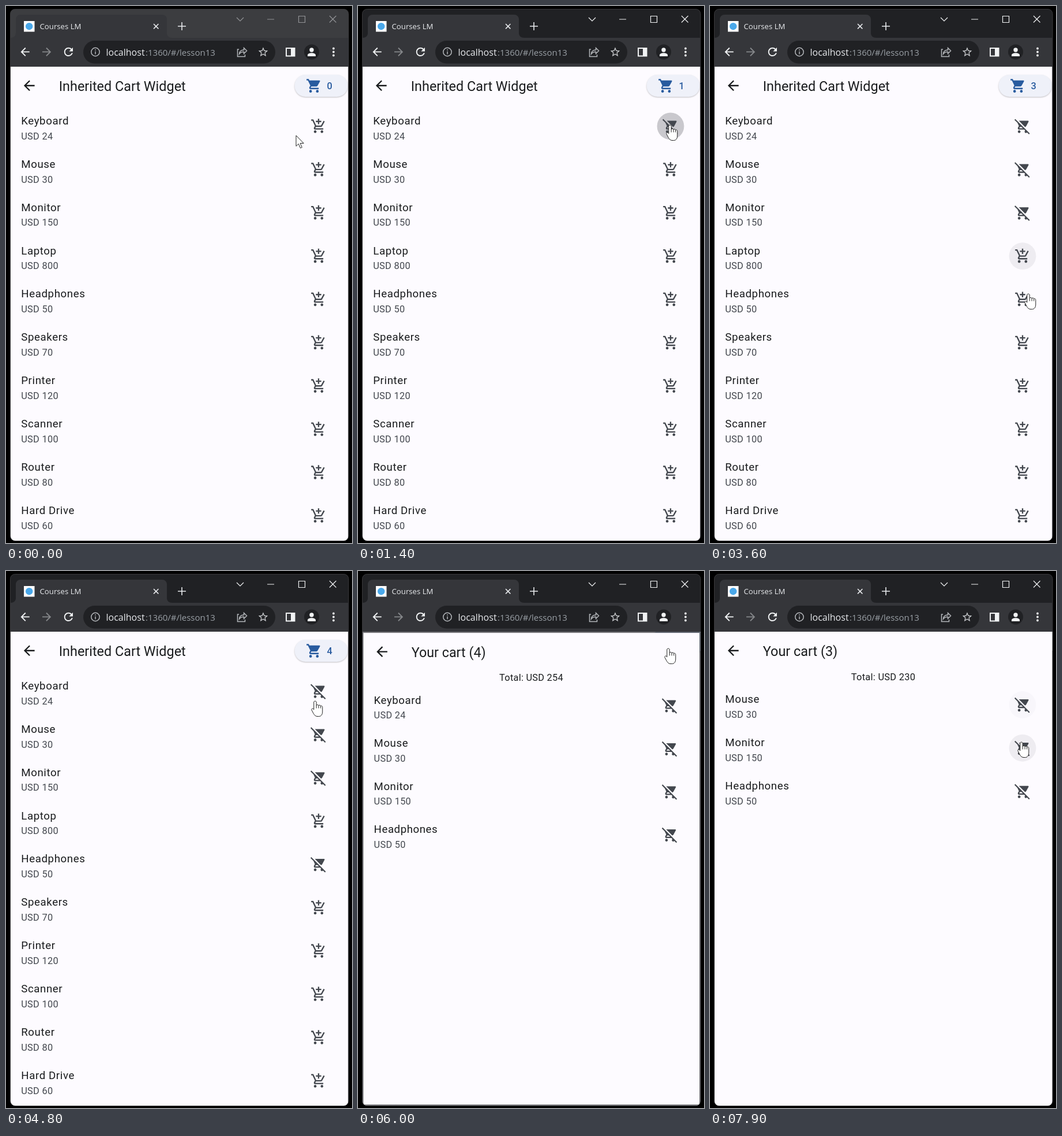
Write an HTML page that moves like this. It is 600 px wide and 929 px high and loops after 8000 ms.

```html
<!DOCTYPE html>
<html lang="en">
<head>
<meta charset="utf-8">
<title>Shopping cart demo</title>
<style>
  html, body { margin: 0; width: 100%; height: 100%; overflow: hidden; background: #000; }
  svg { display: block; width: 600px; height: 929px; }
  text { white-space: pre; }
  .ui { font-family: "Open Sans", "Noto Sans", sans-serif; }
  .app { font-family: Roboto, sans-serif; fill: #1a1c1e; }
  .head { font-size: 23.4px; }
  .name { font-size: 18.72px; letter-spacing: .585px; }
  .price { font-size: 16.38px; letter-spacing: .29px; fill: #43474e; }
  .total { font-size: 16.38px; letter-spacing: .29px; text-anchor: middle; }
  .count { font-size: 16.38px; font-weight: 500; fill: #285b9f; }
  .icon { fill: #43474e; }
  .line { fill: none; stroke: #e8eaed; stroke-width: 1.6; }
  .pill { fill: #eff1f9; filter: drop-shadow(0 1px 1.3px rgba(0, 0, 0, .24)); }
  .cursor path { fill: #fff; stroke: #222; stroke-width: 1; stroke-linejoin: round; }
</style>
</head>
<body>
<svg viewBox="0 0 600 929">
  <defs>
    <path id="back" d="M20 11H7.83l5.59-5.59L12 4l-8 8 8 8 1.41-1.41L7.83 13H20z"/>
    <path id="add" d="M11 9h2V6h3V4h-3V1h-2v3H8v2h3zm-4 9c-1.1 0-1.99.9-1.99 2S5.9 22 7 22s2-.9 2-2-.9-2-2-2zm10 0c-1.1 0-1.99.9-1.99 2s.89 2 1.99 2 2-.9 2-2-.9-2-2-2zm-9.83-3.25l.03-.12.9-1.63h7.45c.75 0 1.41-.41 1.75-1.03l3.86-7.01L19.42 4h-.01l-1.1 2-2.76 5H8.53l-.13-.27L6.16 6l-.95-2-.94-2H1v2h2l3.6 7.59-1.35 2.45c-.16.28-.25.61-.25.96 0 1.1.9 2 2 2h12v-2H7.42c-.13 0-.25-.11-.25-.25z"/>
    <path id="remove" d="M22.73 22.73L1.27 1.27 0 2.54l4.39 4.39 2.21 4.66-1.35 2.45c-.16.28-.25.61-.25.96 0 1.1.9 2 2 2h7.46l1.38 1.38c-.5.36-.83.95-.83 1.62 0 1.1.89 2 1.99 2 .67 0 1.26-.33 1.62-.84L21.46 24zM7.42 15c-.14 0-.25-.11-.25-.25l.03-.12.9-1.63h2.36l2 2zm8.13-2c.75 0 1.41-.41 1.75-1.03l3.58-6.49c.08-.14.12-.31.12-.48 0-.55-.45-1-1-1H6.54zM7 18c-1.1 0-1.99.9-1.99 2S5.9 22 7 22s2-.9 2-2-.9-2-2-2z"/>
    <path id="cart" d="M7 18c-1.1 0-1.99.9-1.99 2S5.9 22 7 22s2-.9 2-2-.9-2-2-2zM1 2v2h2l3.6 7.59-1.35 2.45c-.16.28-.25.61-.25.96 0 1.1.9 2 2 2h12v-2H7.42c-.14 0-.25-.11-.25-.25l.03-.12.9-1.63h7.45c.75 0 1.41-.41 1.75-1.03l3.58-6.49c.08-.14.12-.31.12-.48 0-.55-.45-1-1-1H5.21l-.94-2zm16 16c-1.1 0-1.99.9-1.99 2s.89 2 1.99 2 2-.9 2-2-.9-2-2-2z"/>
    <path id="reload" d="M17.65 6.35C16.2 4.9 14.21 4 12 4c-4.42 0-7.99 3.58-7.99 8s3.57 8 7.99 8c3.73 0 6.84-2.55 7.73-6h-2.08c-.82 2.33-3.04 4-5.65 4-3.31 0-6-2.69-6-6s2.69-6 6-6c1.66 0 3.14.69 4.22 1.78L13 11h7V4z"/>
    <path id="star" d="M22 9.24l-7.19-.62L12 2 9.19 8.63 2 9.24l5.46 4.73L5.82 21 12 17.27 18.18 21l-1.63-7.03zM12 15.4l-3.76 2.27 1-4.28-3.32-2.88 4.38-.38L12 6.1l1.71 4.04 4.38.38-3.32 2.88 1 4.28z"/>
    <clipPath id="view"><path d="M8 105H593.5V917a8 8 0 0 1-8 8H16a8 8 0 0 1-8-8z"/></clipPath>
  </defs>

  <!-- browser window -->
  <rect id="frame" x="7.5" y="5.5" width="586.5" height="919.5" rx="8" stroke="#3a3a3c"/>
  <path fill="#35363a" d="M8 55c5 0 9-3 9-8V23a8 8 0 0 1 8-8H271a8 8 0 0 1 8 8v24c0 5 4 8 9 8H593.5v50H8z"/>
  <rect x="31" y="26" width="18.5" height="18.5" fill="#fff"/>
  <circle cx="40.2" cy="35.2" r="6.2" fill="#4aa8ea"/>
  <g class="ui">
    <text x="58.5" y="40" font-size="13.2" fill="#e8eaed">Courses LM</text>
    <rect x="134" y="60" width="333" height="39.5" rx="19.7" fill="#202124"/>
    <text x="173.5" y="85.5" font-size="16" fill="#e8eaed">localhost</text>
    <text x="242" y="85.5" font-size="15" fill="#9aa0a6">:1360/#/lesson13</text>
  </g>
  <path class="line" d="M256 31l8.4 8.4M264.4 31l-8.4 8.4M298 35h14M305 28v14"/>
  <g id="controls" class="line" style="stroke-width:1.2">
    <path d="M400 20l6 6 6-6M453 23h12M507.5 17.5h11v11h-11zM561 17l11.5 11.5M572.5 17L561 28.5"/>
  </g>
  <g fill="#f1f3f4">
    <use href="#back" transform="translate(21.7 68) scale(.95)"/>
    <use href="#back" transform="translate(82 68) scale(-.95 .95)" fill="#85878a"/>
    <use href="#reload" transform="translate(97 68) scale(.95)"/>
    <use href="#star" transform="translate(436 69.7) scale(.83)" fill="#c8cacd"/>
    <path d="M485 72h16.5v15.5H485zm2 2v11.5h7V74z" fill-rule="evenodd"/>
    <circle cx="530" cy="79.5" r="13" fill="#202124"/>
    <circle cx="530" cy="76" r="3.7"/>
    <path d="M523 87v-2c0-5 14-5 14 0v2z"/>
    <path d="M568 73.5v12.1" stroke="#f1f3f4" stroke-width="3.8" stroke-linecap="round" stroke-dasharray="0 6"/>
  </g>
  <g class="line" style="stroke:#b4b7bb;stroke-width:1.5">
    <circle cx="155" cy="79.5" r="7.2"/>
    <path d="M155 78.5v5M155 75v1.8M404 75h-2.5v12.5h13V84M404.5 83c.5-5 4-7 8-7v-3.5l5 5-5 5v-3.3c-4 0-6 1-8 3.8z"/>
  </g>

  <!-- app pages -->
  <g clip-path="url(#view)" class="app">
    <g id="shop"></g>
    <rect id="scrim" x="8" y="105" width="586" height="820"/>
    <g id="basket"></g>
  </g>

  <g id="cursor" class="cursor">
    <path id="arrow" d="M0 0V18.5L4.3 14.5 7.5 21.8 10.3 20.5 7.2 13.5H13.2z"/>
    <g id="hand">
      <path d="M-2.2 2C-2.2-.6 2.2-.6 2.2 2V7.6C2.6 6 5.8 6 6.1 7.8 6.8 6.4 9.4 6.8 9.7 8.8 10.6 7.6 12.8 8.2 12.8 10.5V18C12.8 23.5 10.5 26.5 6.5 26.5H4C.5 26.500-1 24.5-2.800 21.500L-6 15.5C-6.800 13.500-4.300 12-3 13.7L-2.200 14.8z"/>
      <path style="fill:none" d="M2.2 7.600V12.500M6.100 7.800V12.500M9.700 8.800V12.500"/>
    </g>
  </g>
</svg>

<script>
const LOOP = 8000, TICK = 100;
const S = 1.17; // page zoom: layout units to pixels
const LEFT = 7.5, TOP = 105, PITCH = 64 * S, ICON_X = 542, RADIUS = 20 * S;
const SHOP_Y = TOP + (56 + 32) * S, CART_Y = SHOP_Y + 20 * S;
const PILL = { x: 500.5, y: 119, w: 92, h: 38 };
const FOCUS = 1100, OPEN = 5820, OPEN_TIME = 300, MOVE = 300;

const goods = [
  ["Keyboard", 24], ["Mouse", 30], ["Monitor", 150], ["Laptop", 800], ["Headphones", 50],
  ["Speakers", 70], ["Printer", 120], ["Scanner", 100], ["Router", 80], ["Hard Drive", 60]
];
// tap times by button
const shopTaps = { 0: 1400, 1: 2200, 2: 3000, 4: 3900 };
const cartTaps = { 0: 7500 };

// pointer stops: arrival time, x, y
const stops = [
  [0, 503, 224], [600, 541, 206], [1800, 541.5, 276], [2700, 542, 357], [3600, 552, 498],
  [3800, 546, 511], [4800, 536, 225], [5100, 538, 134], [7200, 543, 236], [7800, 540, 296]
];

const $ = id => document.getElementById(id);
const clamp = v => Math.min(1, Math.max(0, v));

// rest at a stop, then travel to reach the next one on time
function pointer(t) {
  const i = stops.findLastIndex(s => s[0] <= t);
  const [from, x, y] = stops[Math.max(i, 0)];
  const [to, nx, ny] = stops[i + 1] ?? stops[i];
  const span = Math.min(MOVE, to - from);
  const p = span ? clamp((t - to + span) / span) : 0;
  return { x: x + (nx - x) * p, y: y + (ny - y) * p };
}

const onButton = ({ x, y }, cy) => Math.hypot(x - ICON_X, y - cy) < RADIUS;
const onPill = ({ x, y }) => x > PILL.x && y > PILL.y && y < PILL.y + PILL.h;

// hover tint plus a press that swells and fades
function ink(hover, t, tap = Infinity) {
  const press = t < tap ? clamp(1 - (tap - t) / 200) : clamp(1 - (t - tap) / 450);
  return .08 * hover + .2 * press;
}

const icon = (id, x, y, cls = "icon") =>
  `<use href="#${id}" class="${cls}" transform="translate(${x} ${y}) scale(${S})"/>`;

function row([name, price], y, id, t, tap) {
  const tint = ink(onButton(pointer(t - TICK), y), t, tap);
  return `<circle cx="${ICON_X}" cy="${y}" r="${RADIUS}" fill="#43474e" opacity="${tint}"/>
    <text class="name" x="${LEFT + 16 * S}" y="${y - 3}">${name}</text>
    <text class="price" x="${LEFT + 16 * S}" y="${y + 22.7}">USD ${price}</text>` +
    icon(id, ICON_X - 12 * S, y - 12 * S);
}

function page(title, body) {
  return `<rect x="8" y="${TOP}" width="585.5" height="820" fill="#fdfbff"/>` +
    icon("back", LEFT + 16 * S, TOP + 16 * S, "") +
    `<text class="head" x="${LEFT + 72 * S}" y="147">${title}</text>` + body;
}

function drawShop(t, count) {
  const rows = goods.map((g, i) => row(g, SHOP_Y + i * PITCH,
    t >= shopTaps[i] ? "remove" : "add", t, shopTaps[i]));
  const box = `x="${PILL.x}" y="${PILL.y}" width="${PILL.w}" height="${PILL.h}" rx="19"`;
  const tint = ink(onPill(pointer(t - TICK)), t, OPEN);
  $("shop").innerHTML = page("Inherited Cart Widget", rows.join("") +
    `<rect class="pill" ${box}/><rect ${box} fill="#285b9f" opacity="${tint}"/>` +
    `<g fill="#285b9f">${icon("cart", 520, 124, "")}</g>` +
    `<text class="count" x="556.5" y="144">${count}</text>`);
}

function drawBasket(t, basket) {
  const sum = basket.reduce((s, g) => s + g[1], 0);
  const rows = basket.map((g, i) => row(g, CART_Y + i * PITCH, "remove", t, cartTaps[i]));
  $("basket").innerHTML = page(`Your cart (${basket.length})`,
    `<text class="total" x="300.5" y="188.5">Total: USD ${sum}</text>` + rows.join(""));
}

function drawCursor(t, slots) {
  const tip = pointer(t), top = t < OPEN ? SHOP_Y : CART_Y;
  const slot = Math.round((tip.y - top) / PITCH);
  const hand = onPill(tip) || slot >= 0 && slot < slots && onButton(tip, top + slot * PITCH);
  $("cursor").setAttribute("transform", `translate(${tip.x} ${tip.y})`);
  $("hand").style.display = hand ? "" : "none";
  $("arrow").style.display = hand ? "none" : "";
}

function place(id, scale, opacity) {
  $(id).setAttribute("transform", `translate(300.5 515) scale(${scale}) translate(-300.5 -515)`);
  $(id).setAttribute("opacity", opacity);
}

function draw(t) {
  const basket = goods.filter((g, i) => t >= shopTaps[i] && !(t >= cartTaps[i]));
  const p = clamp((t - OPEN) / OPEN_TIME);
  const grow = 1 - (1 - p) ** 3.7;
  const active = t >= FOCUS;

  $("frame").setAttribute("fill", active ? "#202124" : "#3c3d40");
  $("controls").style.stroke = active ? "#f1f3f4" : "#929396";
  drawShop(t, basket.length);
  drawBasket(t, basket);
  place("shop", 1 + .05 * grow, 1);
  place("scrim", 1, .6 * clamp((p - .2) * 5));
  place("basket", .85 + .15 * grow, clamp((p - .125) * 8));
  drawCursor(t, t < OPEN ? goods.length : basket.length);
}

let start, shown;
function frame(now) {
  start ??= now;
  const t = Math.floor((now - start) % LOOP / TICK) * TICK;
  if (t !== shown) draw(shown = t);
  requestAnimationFrame(frame);
}
draw(0);
requestAnimationFrame(frame);
</script>
</body>
</html>
```
